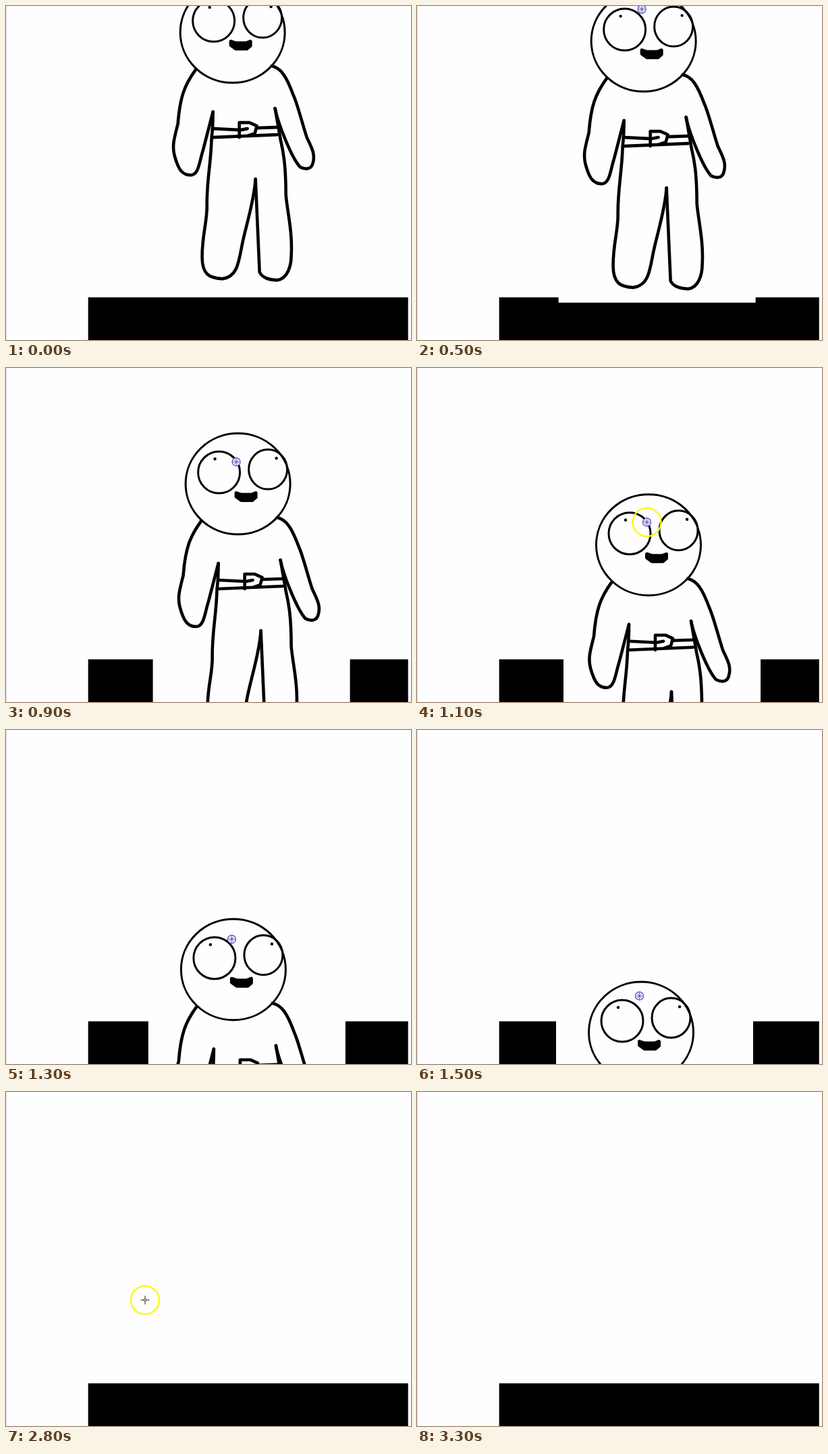
An HTML page for the animation above (4000 ms loop, 600x496 px).

```html
<!DOCTYPE html>
<html lang="en">
<head>
<meta charset="utf-8">
<title>Dragged figure</title>
<style>
  html, body { margin: 0; width: 100%; height: 100%; overflow: hidden; background: #fefdff; }
  svg { display: block; width: 100%; height: 100%; }
  .line { fill: none; stroke: #000; stroke-linecap: round; stroke-linejoin: round; }
</style>
</head>
<body>
<svg viewBox="0 0 600 496">
  <rect width="600" height="496" fill="#fefdff"/>
  <rect width="1" height="496" fill="#dedde5"/>
  <rect x="121.7" y="432.6" width="474" height="64"/>

  <g id="figure">
    <!-- Opaque sheet that cuts into the black floor -->
    <rect x="212" y="12" width="292" height="470.5" fill="#fefdff"/>
    <g class="line" stroke-width="4.6">
      <!-- Left arm, left leg, right leg, right arm -->
      <path d="M283 150 C267 172 260 190 257 230 C252 250 248 262 252 277
        C258 299 264 306 276 306 C288 306 289 285 294 270 L309 212"/>
      <path d="M309 212 Q309 235 307 250 C306 290 300 310 300 350 C301 372 293 395 293 425
        C292 455 305 459 323 460 C345 457 347 436 352 410 C358 380 370 345 372 312"/>
      <path d="M372 312 L378 450 C382 459 394 462 404 462 C420 460 425 440 425 425
        C427 390 419 360 417 335 C417 290 413 270 409 253 L401 207"/>
      <path d="M401 207 C405 228 425 280 438 294 C446 298 455 298 457 288
        C461 275 455 265 448 250 C440 225 434 200 428 187 C418 160 410 147 396 144"/>
      <path d="M310 237 L350 239 360 237 M374 236 L404 235 M308 250 L404 246"/>
      <path d="M348 250 V228 L363 228 374 233 371 244 362 247"/>
    </g>
    <g class="line" stroke-width="3">
      <ellipse cx="338" cy="94" rx="77.5" ry="75"/>
      <circle cx="310" cy="77" r="31"/>
      <ellipse cx="382.5" cy="72.5" rx="28.5" ry="29.5"/>
    </g>
    <circle cx="304" cy="57" r="2.2"/>
    <circle cx="395" cy="56" r="2.2"/>
    <path d="M335.5 107.5 L343 110 H358 L364.5 107.5 V114 L359 118.5 H343 L335.5 113 Z"
      stroke="#000" stroke-width="5" stroke-linejoin="round"/>
  </g>

  <g id="grip" fill="none" stroke="#4a44b4">
    <circle r="6" fill="#f4f3fc" stroke-width="1.2"/>
    <path d="M-5 0 H5 M0 -5 V5 M-3 -3 L3 3 M-3 3 L3 -3" stroke-width=".8"/>
  </g>
  <path id="cross" d="M-6.5 0 H-2 L0 -2 V-6.5 M6.5 0 H2 L0 2 V6.5 M-2 0 L0 2 M2 0 L0 -2"
    fill="none" stroke="#222"/>
  <circle id="ring" r="21" fill="none" stroke="#fafa18" stroke-width="2.4"/>
</svg>

<script>
  const LOOP = 4000, STEP = 100;
  const byId = id => document.getElementById(id);
  const figure = byId("figure"), grip = byId("grip"), cross = byId("cross"), ring = byId("ring");

  // Rests at first, then eases into a steady fall.
  const drop = t => -55 + 467 * 0.104 * Math.log(1 + Math.exp((t - 0.622) / 0.104));

  // Sideways swing that sets in as the fall begins.
  const sway = t => 6.25 * Math.sin(5.54 * Math.max(t - 0.7, -0.07));

  function place(element, visible, x, y) {
    element.style.display = visible ? "" : "none";
    element.setAttribute("transform", `translate(${x} ${y})`);
  }

  function draw(now) {
    const time = Math.floor(now % LOOP / STEP) * STEP;
    const t = time / 1000;
    const dragging = time < 1800;
    const leaving = time >= 2800 && time < 3300;
    const clicked = time === 1100;

    // The hand leads or trails the figure a little as it swings.
    const gripAt = [335.5 + sway(t), 51 + drop(t) + 1.85 * sway(t)];
    const exit = (t - 2.8) / 0.4;
    const crossAt = [206 - 215 * exit, 309 - 276 * exit];

    place(figure, dragging, sway(t), drop(t));
    place(grip, dragging, ...gripAt);
    place(cross, leaving, ...crossAt);
    place(ring, leaving || clicked, ...(leaving ? crossAt : gripAt));
  }

  let start;
  function tick() {
    const now = performance.now();
    start ??= now;
    draw(now - start);
    requestAnimationFrame(tick);
  }
  tick();
</script>
</body>
</html>
```
